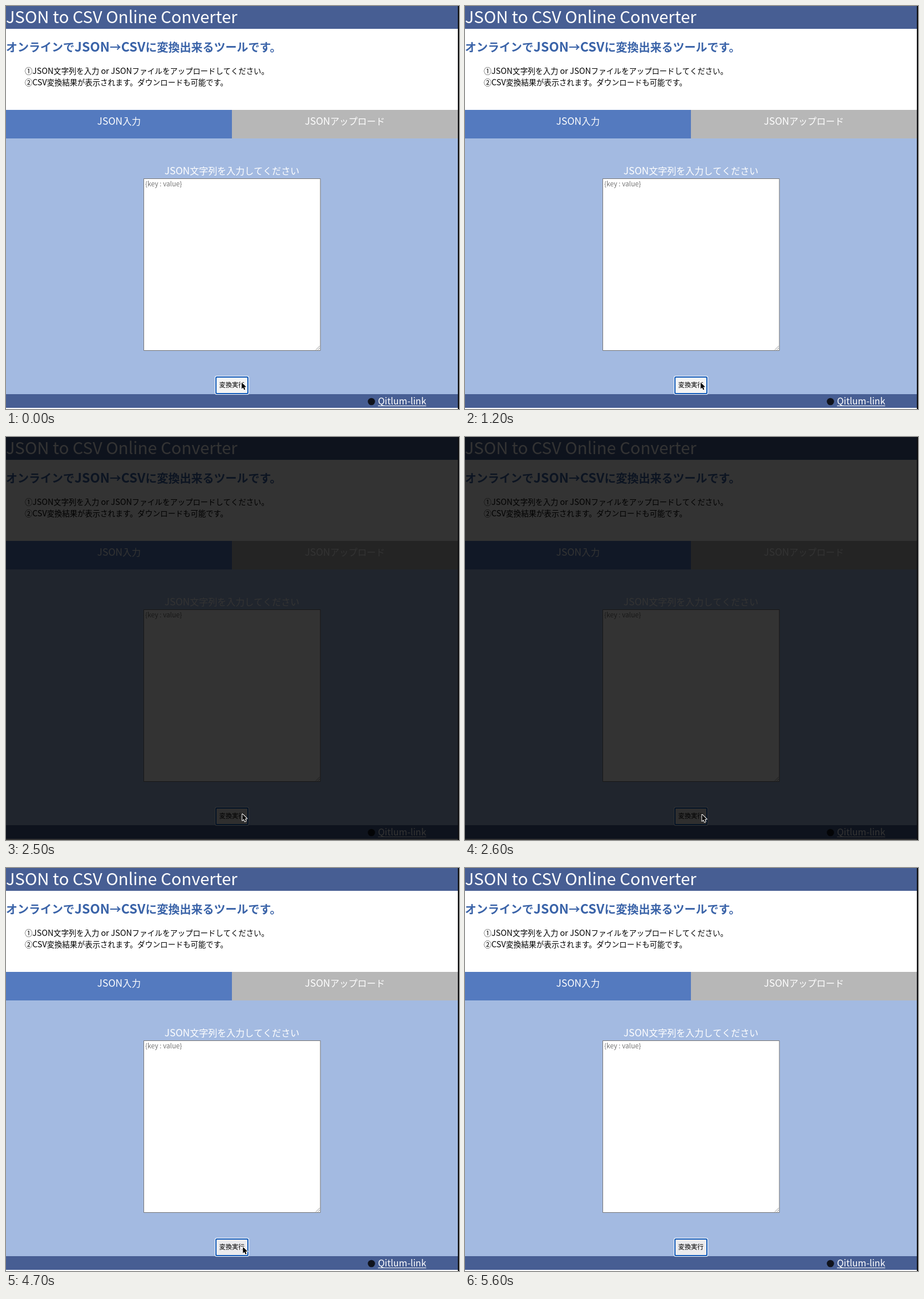
Write an HTML page with a canvas that moves like this. It is 794 px wide and 706 px high and loops after 5.7 s.

```html
<!DOCTYPE html>
<html lang="ja">
<head>
<meta charset="utf-8">
<title>JSON to CSV</title>
<style>
html, body { margin: 0; width: 100%; height: 100%; overflow: hidden; background: #fff; }
canvas { display: block; }
</style>
</head>
<body>
<canvas id="stage" width="794" height="706"></canvas>
<script>
const ctx = document.getElementById('stage').getContext('2d');
const LOOP = 5700, STEP = 100;
const FAMILY = '"Noto Sans CJK JP", "Noto Sans CJK", sans-serif';

function box(x, y, w, h, color) {
  ctx.fillStyle = color;
  ctx.fillRect(x, y, w, h);
}

function round(x, y, w, h, r, color) {
  ctx.fillStyle = color;
  ctx.beginPath();
  ctx.roundRect(x, y, w, h, r);
  ctx.fill();
}

// Latin runs are set slightly larger than the Japanese around them.
function text(str, x, y, size, color, { bold = false, latin = 1.07, center = false } = {}) {
  const runs = str.match(/[ -~]+|[^ -~]+/g).map(s => {
    const px = /[ -~]/.test(s) ? size * latin : size;
    const font = `${bold ? 'bold ' : ''}${px}px ${FAMILY}`;
    ctx.font = font;
    return { s, font, w: ctx.measureText(s).width };
  });
  const total = runs.reduce((sum, r) => sum + r.w, 0);
  let pos = center ? x - total / 2 : x;
  ctx.fillStyle = color;
  for (const r of runs) {
    ctx.font = r.font;
    ctx.fillText(r.s, pos, y);
    pos += r.w;
  }
  return total;
}

function drawHeader() {
  box(0, 0, 792, 40, '#475e93');
  text('JSON to CSV Online Converter', 0, 30, 26.67, '#fff', { latin: 1.092 });
  text('オンラインでJSON→CSVに変換出来るツールです。', 0, 80, 20, '#3a63a8',
    { bold: true, latin: 1.14 });
  text('①JSON文字列を入力 or JSONファイルをアップロードしてください。', 33, 119, 13.33, '#000');
  text('②CSV変換結果が表示されます。ダウンロードも可能です。', 33, 139, 13.33, '#000');
}

function drawForm() {
  box(0, 182, 396, 50, '#547abf');
  box(396, 182, 396, 50, '#b7b7b7');
  box(0, 232, 792, 448, '#a3bae1');
  text('JSON入力', 198, 208, 16, '#fff', { center: true });
  text('JSONアップロード', 594, 208, 16, '#fff', { center: true });
  text('JSON文字列を入力してください', 396, 295, 16, '#fff', { center: true });

  round(241, 302, 310.5, 302, 1, '#767676');
  box(242, 303, 308.5, 300, '#fff');
  text('{key : value}', 244, 315.5, 11.67, '#757575', { latin: 1 });
  ctx.strokeStyle = '#777';
  ctx.lineWidth = 0.8;
  ctx.beginPath();
  for (const d of [7, 3.5]) {
    ctx.moveTo(550 - d, 602.5);
    ctx.lineTo(550, 602.5 - d);
  }
  ctx.stroke();
}

function drawButton(fill) {
  round(366, 648, 60, 33, 3, '#fff');
  round(367, 649, 58, 31, 2.5, '#1059b8');
  round(369, 651, 54, 27, 1, fill);
  text('変換実行', 396, 668.3, 11.1, '#000', { center: true });
}

function drawFooter() {
  box(0, 680, 792, 24, '#475e93');
  ctx.fillStyle = '#10131c';
  ctx.beginPath();
  ctx.arc(640.5, 693, 6.3, 0, Math.PI * 2);
  ctx.fill();
  const w = text('Qitlum-link', 652, 698, 16, '#fff', { latin: 1 });
  box(652, 700, w, 1, '#fff');
}

function drawCursor(x, y) {
  const pts = [[0, 0], [0, 11.2], [2.6, 8.8], [4.4, 13], [6.3, 12.2], [4.6, 8.1], [8.1, 8]];
  ctx.beginPath();
  pts.forEach(([dx, dy]) => ctx.lineTo(x + dx, y + dy));
  ctx.closePath();
  ctx.lineJoin = 'round';
  ctx.lineWidth = 2;
  ctx.strokeStyle = '#fff';
  ctx.stroke();
  ctx.fillStyle = '#000';
  ctx.fill();
}

// Pointer tip over time; it is hidden after the last point.
const path = [[0, 413, 659.5], [2400, 413, 659.5], [2600, 415.5, 661.5], [4500, 415.5, 661.5],
  [5000, 415, 667], [5200, 415, 670]];

function pointerAt(t) {
  const i = path.findIndex(p => p[0] > t);
  if (i < 1) return null;
  const [t0, x0, y0] = path[i - 1], [t1, x1, y1] = path[i];
  const k = (t - t0) / (t1 - t0);
  return [x0 + (x1 - x0) * k, y0 + (y1 - y0) * k];
}

function draw(t) {
  const pointer = pointerAt(t);
  const pressed = t >= 4800 && t < 5200;
  box(0, 0, 794, 706, '#fff');
  drawHeader();
  drawForm();
  drawFooter();
  drawButton(pressed ? '#e3e3e3' : t < 1300 ? '#f4f4f4' : '#ebebee');
  if (t >= 1300 && t < 4300) box(0, 0, 792, 706, 'rgba(0,0,0,0.8)');
  box(792, 0, 2, 706, '#0c0c0e');
  if (pointer) drawCursor(...pointer);
}

function tick() {
  const t = performance.now() % LOOP;
  draw(Math.floor(t / STEP) * STEP);
  requestAnimationFrame(tick);
}
tick();
</script>
</body>
</html>
```
